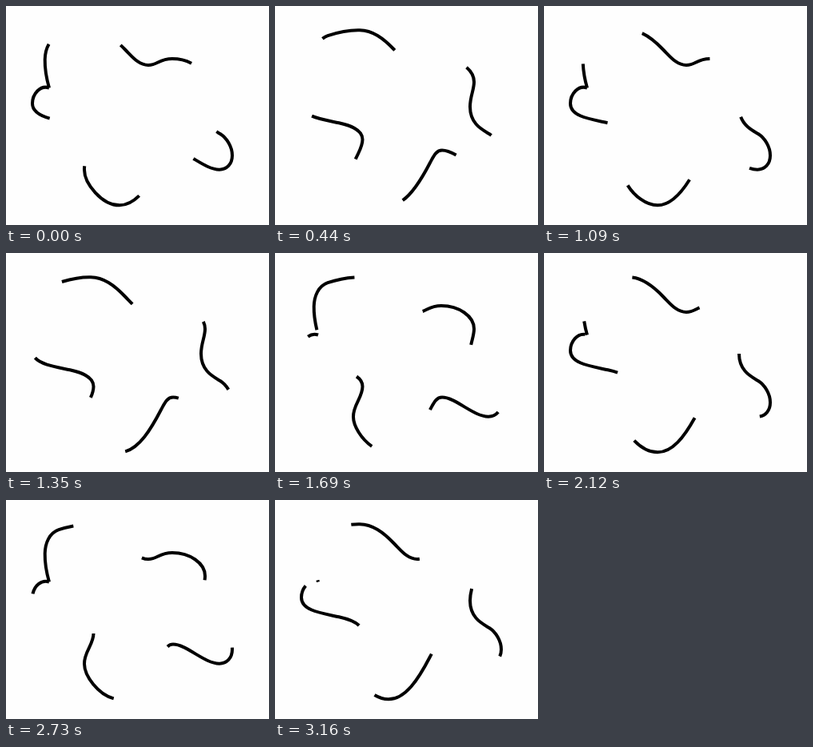
These frames come from a looping animation (329 by 274 pixels, 3.25 s). An HTML page:

```html
<!DOCTYPE html>
<html lang="en">
<head>
<meta charset="utf-8">
<title>Travelling dashes</title>
<style>
  html, body { margin: 0; width: 100%; height: 100%; overflow: hidden; background: #fefefe; }
  svg { display: block; }
  path { fill: none; stroke: #000; stroke-width: 4; stroke-dasharray: 100; }
</style>
</head>
<body>
<svg width="329" height="274" viewBox="0 0 329 274">
  <path id="blob" pathLength="820" d="M54 102.5
    C51 92 48.5 78 48.7 67
    C49 54 54 41.5 66 37.2
    C77 33.5 94 30 106 30.3
    C122 30.5 135 40 149 54.5
    C158 63.5 166 74 178 74
    C190 74 191 66 208 66
    C230 66 249 79 249 95
    C249 105 244 113 244 126
    C244 148 260 155 268 160
    C276 165 283 176 283 187
    C283 198 276 204.7 267 204.7
    C248 204.7 226 180.6 209 180.6
    C201 180.6 198 189 194 196
    C179 225 163 249.3 142 249.3
    C120 249.3 98 222 98 205
    C97.5 190 109.5 181 109.5 167
    C109.5 154 92 149 80 146.3
    C58 141.5 33 138.5 33 122
    C33 110 43 98.5 54 102.5"/>
</svg>
<script>
  const LOOP = 3250;
  const START = 44;      // dash offset at the start of the loop
  const SPEED = 0.2068;  // path units per ms

  // Runs of evenly spaced steps: first time, last time, count
  const runs = [
    [90, 530, 6], [620, 1090, 6], [1180, 1690, 7],
    [1770, 2210, 6], [2300, 2820, 7], [2900, 3160, 4]
  ];
  const steps = [0, ...runs.flatMap(([from, to, n]) =>
    Array.from({ length: n }, (_, i) =>
      Math.floor((from + (to - from) * i / (n - 1)) / 10) * 10))];

  const blob = document.getElementById('blob');

  function draw() {
    const now = performance.now() % LOOP;
    const time = steps.findLast(step => step <= now);
    blob.style.strokeDashoffset = START + SPEED * time;
    requestAnimationFrame(draw);
  }
  draw();
</script>
</body>
</html>
```
